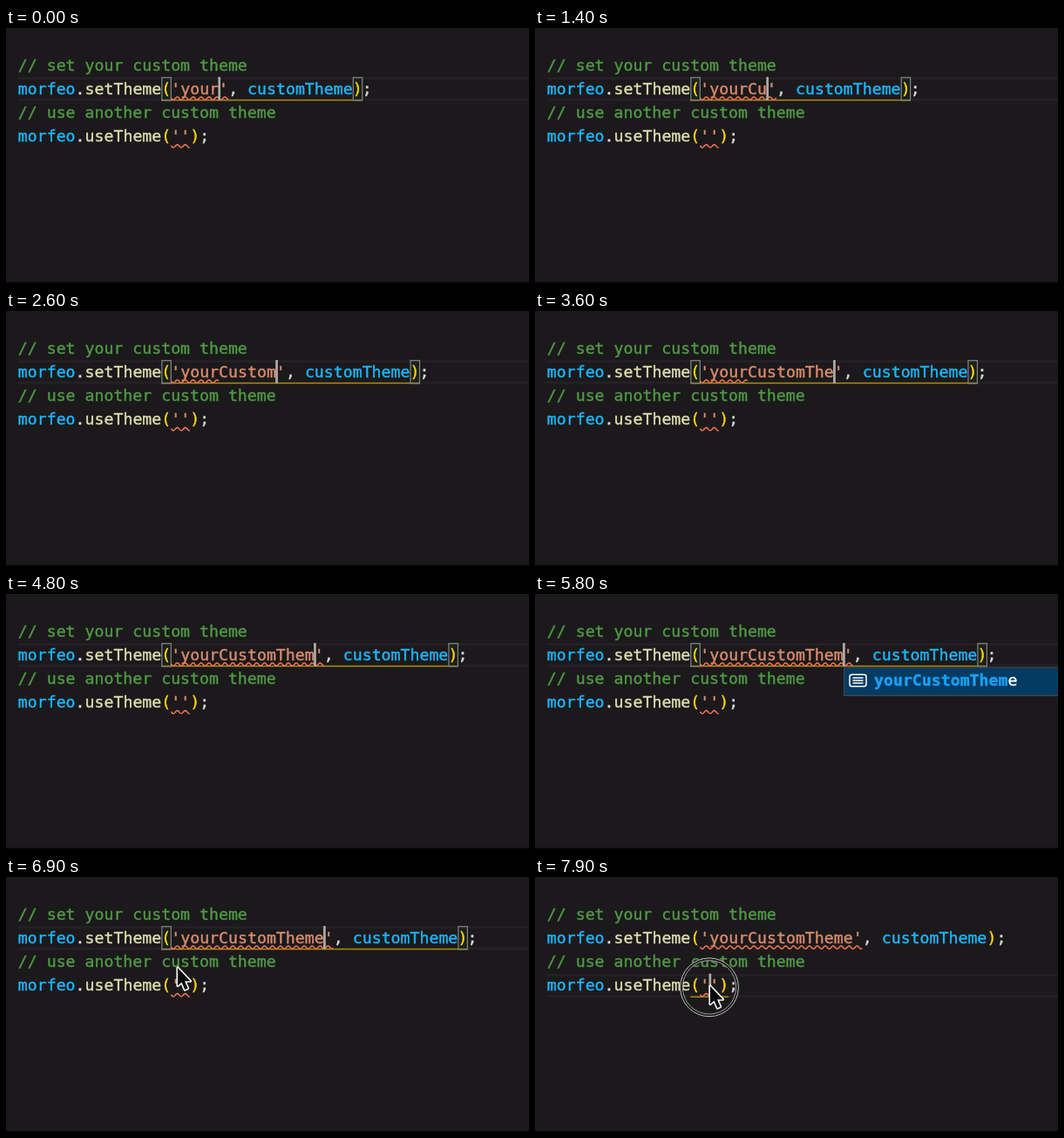
Recreate the animation shown at these times as an HTML page with a canvas. Size 600 by 292 pixels, loop 8000 ms.

```html
<!DOCTYPE html>
<html lang="en">
<head>
<meta charset="utf-8">
<title>Code typing</title>
<style>
  html, body { margin: 0; width: 100%; height: 100%; overflow: hidden; background: #1b191b; }
  canvas { display: block; }
</style>
</head>
<body>
<canvas id="stage" width="600" height="292"></canvas>
<script>
const LOOP = 8000, STEP = 100;
const LEFT = 13.8, CHAR = 10.97, TOP = 28.8, LINE = 27.3;
const FONT = '18.22px "DejaVu Sans Mono", monospace';
const C = {
  back: '#1b191b', comment: '#4f9a43', name: '#18b9ff', method: '#dfdfae',
  string: '#db8c6c', plain: '#d8d8d8', bracket: '#ffd70a', error: '#f4744f',
  guide: '#b08d08', caret: '#acacaa', active: '#232123'
};
const WORD = 'yourCustomTheme';
const TYPED = 4; // letters present at the start
const KEYS = [1000, 1300, 1600, 1900, 2200, 2500, 2900, 3200, 3500, 3800, 5900];
const POPUP = [5200, 5900], STALE = [2000, 4300], CLICK = 7700;
const MOUSE = [[6600, 194, 95], [6900, 197, 104], [7200, 200, 118], [7500, 201, 121], [7600, 201, 121], [7700, 201, 125]];

const ctx = document.getElementById('stage').getContext('2d');
const colX = col => LEFT + col * CHAR;
const rowY = row => TOP + row * LINE;
const within = (t, [from, to]) => t >= from && t < to;

function rect(x, y, w, h, color) {
  ctx.fillStyle = color;
  ctx.fillRect(x, y, w, h);
}

// A hairline stroke gives the heavier look of smoothed screen text.
function text(str, x, y, color, weight = '') {
  ctx.font = weight + ' ' + FONT;
  ctx.fillStyle = ctx.strokeStyle = color;
  ctx.lineWidth = 0.4;
  ctx.fillText(str, x, y);
  ctx.strokeText(str, x, y);
}

function codeLine(row, tokens) {
  let col = 0;
  for (const [str, kind] of tokens) {
    text(str, colX(col), rowY(row) + 19.7, C[kind]);
    col += str.length;
  }
}

function squiggle(row, from, to) {
  const start = colX(from), end = colX(to), mid = rowY(row) + 24.5;
  ctx.beginPath();
  for (let x = start; x <= end; x += 0.5) {
    ctx.lineTo(x, mid + 1.7 * Math.cos((x - start - 2.65) * 2 * Math.PI / 9.1));
  }
  ctx.strokeStyle = C.error;
  ctx.lineWidth = 1.5;
  ctx.stroke();
}

function bracketBox(row, col) {
  const box = [colX(col) + 0.5, rowY(row) + 0.6, CHAR - 0.5, LINE - 1.2];
  rect(...box, 'rgba(0, 100, 0, 0.1)');
  ctx.strokeStyle = '#858585';
  ctx.lineWidth = 1.2;
  ctx.strokeRect(...box);
}

function activeLine(row) {
  rect(LEFT, rowY(row) + 0.2, 600, 2.8, C.active);
  rect(LEFT, rowY(row) + LINE - 2.8, 600, 2.8, C.active);
}

function guide(row, from, to) {
  rect(colX(from), rowY(row) + LINE - 1.5, colX(to) - colX(from), 1.4, C.guide);
}

function popup() {
  rect(354, 83.5, 250, 33.5, '#454547');
  rect(355.2, 84.7, 250, 31, '#043b62');
  ctx.strokeStyle = '#fff';
  ctx.lineWidth = 1.5;
  ctx.beginPath();
  ctx.roundRect(361, 92.2, 19, 13.5, 2.5);
  for (const y of [96, 99, 102]) {
    ctx.moveTo(364.5, y);
    ctx.lineTo(376.5, y);
  }
  ctx.stroke();
  const x = 389, y = 105.2;
  text(WORD.slice(0, -1), x, y, '#18a0f8', 'bold');
  text(WORD.slice(-1), x + 14 * CHAR, y, '#fff');
}

function mouseAt(t) {
  const next = MOUSE.findIndex(p => p[0] > t);
  if (next < 0) return MOUSE[MOUSE.length - 1].slice(1);
  const [t0, x0, y0] = MOUSE[next - 1], [t1, x1, y1] = MOUSE[next];
  const k = (t - t0) / (t1 - t0);
  return [x0 + (x1 - x0) * k, y0 + (y1 - y0) * k];
}

function mouse([x, y]) {
  const arrow = new Path2D('M0 0V20.5L4.6 16.4L8.3 25L11.6 23.5L8 15.2H14.4Z');
  ctx.save();
  ctx.translate(x, y);
  ctx.lineJoin = 'round';
  ctx.lineWidth = 3.2;
  ctx.strokeStyle = '#f4f4f4';
  ctx.stroke(arrow);
  ctx.fillStyle = '#080808';
  ctx.fill(arrow);
  ctx.restore();
}

function ring(x, y) {
  for (const [r, width, color] of [[32.2, 3, '#151415'], [33.4, 1, '#c4c4c4'], [30.7, 1, '#a0a0a0']]) {
    ctx.beginPath();
    ctx.arc(x, y, r, 0, 2 * Math.PI);
    ctx.lineWidth = width;
    ctx.strokeStyle = color;
    ctx.stroke();
  }
}

function draw(t) {
  const keys = KEYS.filter(k => k <= t);
  const typed = WORD.slice(0, TYPED + keys.length);
  const quoteEnd = 18 + typed.length, close = quoteEnd + 13;
  const clicked = t >= CLICK;
  const row = clicked ? 3 : 1;

  rect(0, 0, 600, 292, C.back);
  rect(0, 290.7, 600, 1.3, '#080808');
  activeLine(row);

  if (clicked) {
    guide(3, 15, 19);
  } else {
    guide(1, 15, close + 1);
    bracketBox(1, 15);
    bracketBox(1, close);
  }

  codeLine(0, [['// set your custom theme', 'comment']]);
  codeLine(1, [['morfeo', 'name'], ['.', 'plain'], ['setTheme', 'method'], ['(', 'bracket'],
    [`'${typed}'`, 'string'], [', ', 'plain'], ['customTheme', 'name'], [')', 'bracket'], [';', 'plain']]);
  codeLine(2, [['// use another custom theme', 'comment']]);
  codeLine(3, [['morfeo', 'name'], ['.', 'plain'], ['useTheme', 'method'], ['(', 'bracket'],
    ["''", 'string'], [')', 'bracket'], [';', 'plain']]);

  squiggle(1, 16, within(t, STALE) ? 21 : quoteEnd);
  squiggle(3, 16, 18);

  const lastEdit = clicked ? CLICK : keys.length ? keys[keys.length - 1] : 0;
  if ((t - lastEdit) % 1000 < 500) {
    const col = clicked ? 17 : 17 + typed.length;
    rect(colX(col) - 0.8, rowY(row), 2.7, LINE - 0.6, C.caret);
  }

  if (within(t, POPUP)) popup();
  if (clicked) ring(200, 126.3);
  if (t >= MOUSE[0][0]) mouse(mouseAt(t));
}

function tick() {
  draw(Math.floor(performance.now() % LOOP / STEP) * STEP);
  requestAnimationFrame(tick);
}
tick();
</script>
</body>
</html>
```
